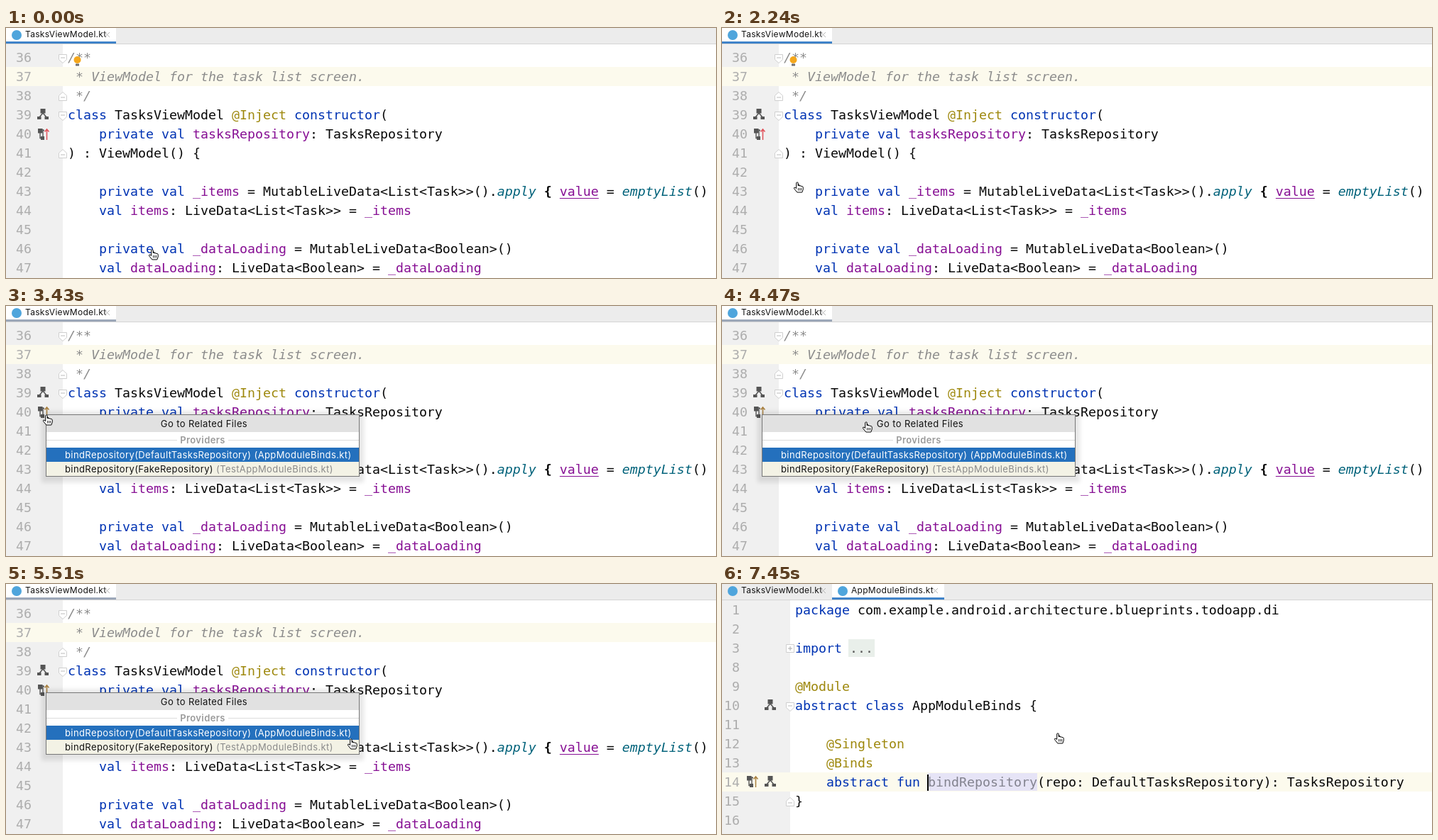
An HTML page for the animation above (8000 ms loop, 1000 by 353 pixels).

```html
<!DOCTYPE html>
<html lang="en">
<head>
<meta charset="utf-8">
<title>Go to related files</title>
<style>
html, body { margin: 0; width: 100%; height: 100%; overflow: hidden; background: #fff; }
#stage { position: relative; width: 1000px; height: 353px; overflow: hidden; background: #fff; font: 12px/16px Inter, sans-serif; color: #111; }
#stage * { box-sizing: border-box; }
.scene, .scene > *, .popup > *, .tab > *, #mouse { position: absolute; }
.scene { inset: 0; background: #fff; }
svg { position: absolute; left: 0; top: 0; overflow: visible; }

/* tabs */
.bar { left: 0; top: 0; width: 1000px; height: 23px; background: #ececec; border-bottom: 1px solid #d4d4d4; }
.tab { top: 0; height: 22px; white-space: nowrap; }
.tab.on { background: #fff; border-bottom: 3px solid #4083c9; }
.tab span { left: 27px; top: 1px; letter-spacing: .3px; }
.tab::before { content: ""; position: absolute; left: 8px; top: 3px; width: 14px; height: 14px; border-radius: 50%; background: #4fa5dc; }
.tab svg { left: auto; right: 8px; top: 5px; }

/* code */
.gutter { left: 0; top: 23px; height: 330px; background: #f0f0f0; }
.line { left: 0; width: 1000px; height: 27px; background: #fcfaed; }
pre { margin: 0; font: 18.27px/27px "DejaVu Sans Mono", monospace; color: #080808; }
.nums { left: 0; text-align: right; color: #adadad; }
.k { color: #0033b3; }
.f { color: #871094; }
.a { color: #9e880d; }
.c { color: #8c8c8c; font-style: italic; }
.m { color: #00627a; font-style: italic; }
u { text-decoration-thickness: 1px; text-underline-offset: 3px; }
.fold { background: #e9efea; color: #555; box-shadow: 0 0 0 2px #e9efea; }
.mark { background: #e6e4f6; color: #83838f; padding: 2px 0; }
.caret { width: 2px; height: 23px; background: #000; }

/* popup */
.popup { left: 56px; top: 153px; width: 442px; height: 88px; background: #fff; border: 1px solid #777; box-shadow: 0 2px 6px 6px rgba(0,0,0,.1); font-size: 13px; line-height: 20px; letter-spacing: .4px; white-space: nowrap; }
.popup > * { left: 0; width: 440px; height: 20px; }
.popup .head { top: 0; height: 24px; line-height: 24px; background: #e1e1e1; text-align: center; padding-left: 4px; }
.popup .group { top: 25px; display: flex; align-items: center; gap: 4px; font-weight: 600; color: #9a9a9a; }
.group::before, .group::after { content: ""; flex: 1; height: 1px; background: #dcdcdc; }
.popup .row { top: 46px; padding-left: 26px; background: #2470bd; color: #fff; }
.popup .row + .row { top: 66px; background: #f3f2e5; color: #111; }
.row i { font-style: normal; color: #8a8a8a; }

/* timeline */
.scene, .scene .anim, #mouse, #mouse > g, .tab.on, .red { animation: 8s step-end infinite; }
#first { animation-name: first; }
#second { animation-name: second; }
.popup.anim { animation-name: popup; }
.caret.anim { animation-name: blink; }
#bulb.anim { animation-name: bulb; }
#first .tab.on { animation-name: blur; }
#first .red { animation-name: tint; }
#mouse { animation-name: move; }
#arrow { animation-name: arrow; }
#hand { animation-name: hand; }
@keyframes first { 0% { visibility: visible } 91.2%, 100% { visibility: hidden } }
@keyframes second { 0% { visibility: hidden } 91.2%, 100% { visibility: visible } }
@keyframes popup { 0% { opacity: 0 } 39.1% { opacity: 1 } 89.3%, 100% { opacity: 0 } }
@keyframes blink { 0% { opacity: 0 } 13.1% { opacity: 1 } 24.2% { opacity: 0 } 33.5% { opacity: 1 } 39.1%, 100% { opacity: 0 } }
@keyframes bulb { 0% { opacity: 1 } 31.6%, 100% { opacity: 0 } }
@keyframes blur { 39.1% { border-color: #9ca7b8 } 89.3%, 100% { border-color: #4083c9 } }
@keyframes tint { 39.1%, 100% { color: #a9803f } }
@keyframes arrow { 0% { opacity: 0 } 24.2% { opacity: 1 } 61.4% { opacity: 0 } 89.3%, 100% { opacity: 1 } }
@keyframes hand { 0% { opacity: 0 } 61.4% { opacity: 1 } 89.3%, 100% { opacity: 0 } }
@keyframes move {
  0%, 24.2% { transform: translate(205px, 312px) }
  26.1% { transform: translate(144px, 258px) }
  27.9% { transform: translate(105px, 217px) }
  29.8% { transform: translate(84px, 190px) }
  31.6% { transform: translate(71px, 172px) }
  33.5% { transform: translate(62px, 161px) }
  35.3% { transform: translate(58px, 156px) }
  37.2% { transform: translate(56px, 153px) }
  52.2% { transform: translate(96px, 155px) }
  54.1% { transform: translate(150px, 158px) }
  55.8% { transform: translate(202px, 163px) }
  57.7% { transform: translate(290px, 175px) }
  59.6% { transform: translate(370px, 190px) }
  61.4% { transform: translate(425px, 203px) }
  63.3% { transform: translate(458px, 211px) }
  65.2% { transform: translate(476px, 215px) }
  66.9% { transform: translate(482px, 217px) }
  68.8% { transform: translate(485px, 218px) }
  70.7% { transform: translate(485px, 217px) }
  78.2% { transform: translate(478px, 213px) }
  79.9%, 100% { transform: translate(472px, 210px) }
}
</style>
</head>
<body>
<div id="stage">
  <svg width="0" height="0">
    <defs>
      <g id="down"><path d="M-5.5-5.5H5.5V1.5L0 6.5L-5.5 1.5Z" fill="#fff" stroke="#cfcfcf"/><path d="M-3-1H3" stroke="#bbb"/></g>
      <g id="up"><path d="M-5.5 5.5H5.5V-1.5L0-6.5L-5.5-1.5Z" fill="#fff" stroke="#cfcfcf"/><path d="M-3 1H3" stroke="#bbb"/></g>
      <g id="plus"><path d="M-5.5-5.5H5.5V5.5H-5.5Z" fill="#fff" stroke="#cfcfcf"/><path d="M-3 0H3M0-3V3" stroke="#aaa"/></g>
      <g id="tree" fill="#555"><path d="M-3.5-8H3.5V-1.5H-3.5ZM-8 3H-2.5V7H-8ZM2.5 3H8V7H2.5Z"/><path d="M-5 4L0-2L5 4" fill="none" stroke="#555" stroke-width="1.5"/></g>
      <g id="link" fill="#555"><path d="M-8-8H-1.5V-1.5H-8ZM-4 3H1V8H-4Z"/><path d="M-1.5-5.5H1M-5-2V5.5H-3M-1-7V4" fill="none" stroke="#555" stroke-width="1.4"/><path d="M4.5 8V-7M1.5-3.5L4.5-7L7.5-3.5" fill="none" stroke="currentColor" stroke-width="1.5"/></g>
      <path id="x" d="M1 1L8 8M8 1L1 8" stroke="#b5b5b5"/>
    </defs>
  </svg>

  <div class="scene" id="first">
    <div class="bar"></div>
    <div class="tab on" style="left:0;width:155px"><span>TasksViewModel.kt</span><svg width="9" height="9"><use href="#x"/></svg></div>
    <div class="gutter" style="width:80px"></div>
    <div class="line" style="top:55px"></div>
    <pre class="nums" style="top:28px;width:36px">36
37
38
39
40
41
42
43
44
45
46
47</pre>
    <svg width="1000" height="353">
      <use href="#down" x="80" y="43"/><use href="#up" x="80" y="97"/>
      <use href="#down" x="80" y="124"/><use href="#up" x="80" y="178"/>
      <use href="#tree" x="52" y="122"/>
      <g class="red" color="#e0525a"><use href="#link" x="53" y="150"/></g>
    </svg>
    <pre style="left:87px;top:28px"><span class="c">/**
 * ViewModel for the task list screen.
 */</span>
<span class="k">class</span> TasksViewModel <span class="a">@Inject</span> <span class="k">constructor</span>(
    <span class="k">private val</span> <span class="f">tasksRepository</span>: TasksRepository
) : ViewModel() {

    <span class="k">private val</span> <span class="f">_items</span> = MutableLiveData&lt;List&lt;Task&gt;&gt;().<span class="m">apply</span> <b>{</b> <u class="f">value</u> = <span class="m">emptyList</span>()
    <span class="k">val</span> <span class="f">items</span>: LiveData&lt;List&lt;Task&gt;&gt; = <span class="f">_items</span>

    <span class="k">private val</span> <span class="f">_dataLoading</span> = MutableLiveData&lt;Boolean&gt;()
    <span class="k">val</span> <span class="f">dataLoading</span>: LiveData&lt;Boolean&gt; = <span class="f">_dataLoading</span></pre>
    <svg id="bulb" class="anim" width="1000" height="353"><circle cx="100.5" cy="45" r="5" fill="#f4a71c"/><path d="M98 50.5H103V53.5H98Z" fill="#6e6e6e"/></svg>
    <div class="caret anim" style="left:504px;top:58px"></div>
    <div class="popup anim">
      <div class="head">Go to Related Files</div>
      <div class="group">Providers</div>
      <div class="row">bindRepository(DefaultTasksRepository) (AppModuleBinds.kt)</div>
      <div class="row">bindRepository(FakeRepository) <i>(TestAppModuleBinds.kt)</i></div>
    </div>
  </div>

  <div class="scene" id="second">
    <div class="bar"></div>
    <div class="tab" style="left:0;width:155px"><span>TasksViewModel.kt</span><svg width="9" height="9"><use href="#x"/></svg></div>
    <div class="tab on" style="left:155px;width:158px"><span>AppModuleBinds.kt</span><svg width="9" height="9"><use href="#x"/></svg></div>
    <div class="gutter" style="width:96px"></div>
    <div class="line" style="top:266px"></div>
    <pre class="nums" style="top:23px;width:25px">1
2
3
8
9
10
11
12
13
14
15
16</pre>
    <svg width="1000" height="353">
      <use href="#plus" x="96" y="91"/><use href="#down" x="96" y="173"/><use href="#up" x="96" y="308"/>
      <use href="#tree" x="68" y="171"/><use href="#tree" x="68" y="279"/>
      <g color="#a9803f"><use href="#link" x="43" y="279"/></g>
    </svg>
    <pre style="left:103px;top:23px"><span class="k">package</span> com.example.android.architecture.blueprints.todoapp.di

<span class="k">import</span> <span class="fold">...</span>

<span class="a">@Module</span>
<span class="k">abstract class</span> AppModuleBinds {

    <span class="a">@Singleton</span>
    <span class="a">@Binds</span>
    <span class="k">abstract fun</span> <span class="mark">bindRepository</span>(repo: DefaultTasksRepository): TasksRepository
}
</pre>
    <div class="caret" style="left:289px;top:269px"></div>
  </div>

  <svg id="mouse" width="20" height="20" stroke="#fff" stroke-linejoin="round">
    <g id="arrow"><path d="M0 0V12.5L2.9 9.8L5 14.5L7.3 13.5L5.2 9H9Z" fill="#000"/></g>
    <g id="hand"><path d="M-.3 1.5Q1 0 2.2 1.5V5.5Q3.5 4.7 4.6 6Q6 5.3 7 6.6Q8.8 6 9.2 7.8V11L7.8 15H.8L-3.6 9.5Q-3.8 7.8-2 8.2L-.3 9.5Z" fill="#fff" stroke="#000"/><path d="M2.5 9V12.5M4.6 9V12.5M6.6 9V12.5" stroke="#000" stroke-width=".8"/></g>
  </svg>
</div>
</body>
</html>
```
